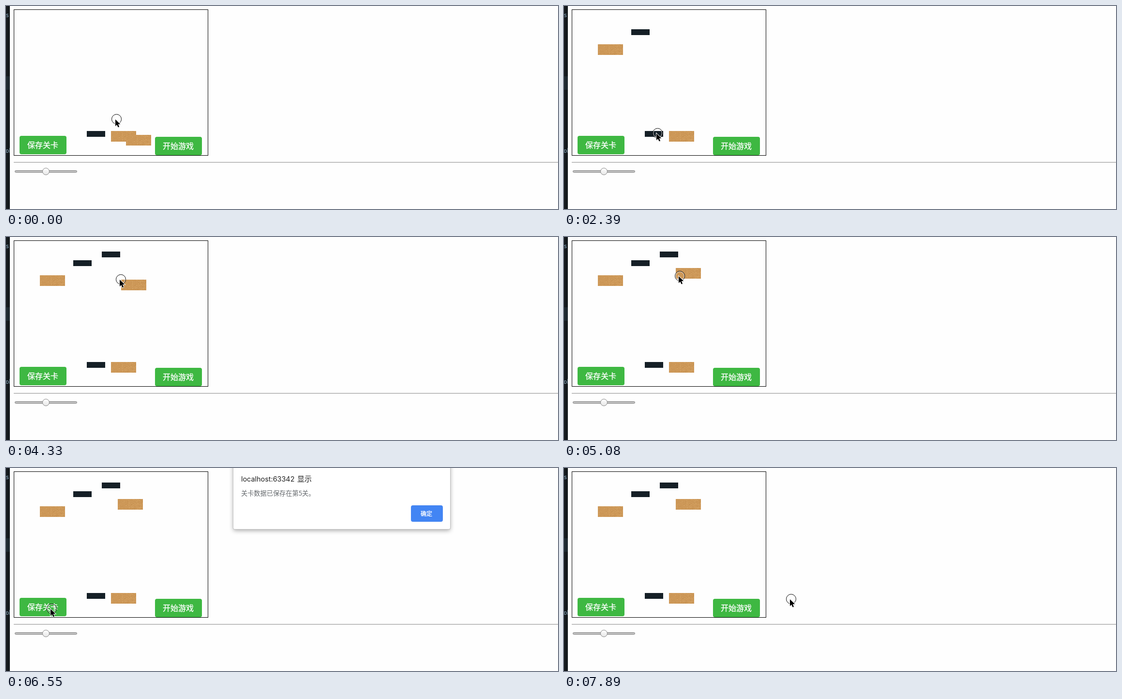
These frames come from a looping animation (1141 px wide and 419 px high, 8 s). An HTML page:

```html
<!DOCTYPE html>
<html lang="zh-CN">
<head>
<meta charset="utf-8">
<title>Level editor</title>
<style>
  html, body { margin: 0; width: 100%; height: 100%; overflow: hidden; background: #fefefe; }
  svg { display: block; width: 1141px; height: 419px; }
  text { font-family: "Noto Sans CJK SC", "Noto Sans CJK", sans-serif; }
  .btn rect { fill: #3eb842; }
  .btn text { fill: #fff; font-size: 16px; stroke: #fff; stroke-width: .3px; }
  .side { font: 600 12px "Open Sans", sans-serif; fill: #7893a6; }
  .panel { filter: drop-shadow(0 3px 5px rgba(0, 0, 0, .35)); }
  .host { font: 14.4px Inter, sans-serif; }
</style>
</head>
<body>
<svg viewBox="0 0 1141 419" xmlns="http://www.w3.org/2000/svg">
  <defs>
    <g id="brick"><rect width="52" height="22" fill="#cd9858"/></g>
    <g id="stone"><rect width="38" height="12" fill="#151f26"/></g>
    <clipPath id="edge"><rect width="8" height="419"/></clipPath>
    <linearGradient id="knob" x2="0" y2="1">
      <stop stop-color="#fff"/><stop offset="1" stop-color="#e6e6e6"/>
    </linearGradient>
    <path id="arrow" d="M0 0V14L3.2 11L5.6 16.3L8.1 15.2L5.8 10H10.3Z"/>
  </defs>

  <rect width="1141" height="419" fill="#fefefe"/>
  <g clip-path="url(#edge)">
    <rect width="8" height="419" fill="#14191d"/>
    <rect y="145" width="8" height="28" fill="#1e2930"/>
    <text class="side" x="0" y="23">s</text>
    <text class="side" x="-1" y="303">ol</text>
  </g>

  <rect x="16.5" y="7.5" width="401" height="301" fill="none" stroke="#000"/>
  <g class="btn">
    <rect x="28" y="268" width="97" height="38" rx="4"/>
    <text x="44" y="293">保存关卡</text>
    <rect x="308" y="270" width="97" height="38" rx="4"/>
    <text x="324" y="295">开始游戏</text>
  </g>
  <rect x="16" y="322" width="1125" height="1" fill="#979797"/>
  <rect x="16" y="323" width="1125" height="1" fill="#ececec"/>
  <rect x="18.5" y="339.5" width="128" height="4" rx="2" fill="#c0c0c0" stroke="#868686"/>
  <circle cx="82.5" cy="341.5" r="7" fill="url(#knob)" stroke="#858585"/>

  <use href="#stone" x="167" y="258"/>
  <use href="#brick" x="217" y="258"/>
  <g id="blocks"></g>

  <g id="dialog">
    <rect class="panel" x="470" y="-20" width="448" height="146" rx="2" fill="#fff"/>
    <rect x="469.5" y="-20" width="449" height="146.5" rx="2.5" fill="none" stroke="#c2c2c2"/>
    <text class="host" x="486" y="28" fill="#222">localhost:63342</text>
    <text x="602" y="28" font-size="15" fill="#222">显示</text>
    <text x="486" y="57" font-size="13.2" fill="#666a6e">关卡数据已保存在第5关。</text>
    <rect x="837.5" y="77.5" width="65" height="33" rx="3" fill="#4285f4" stroke="#4a88f0"/>
    <text x="857" y="98.5" font-size="12" fill="#fff" stroke="#fff" stroke-width=".3">确定</text>
  </g>

  <g id="cursor">
    <circle r="9" fill="none" stroke="#fff"/>
    <circle r="10" fill="none" stroke="#000"/>
    <use href="#arrow" x="-2" y="1.7" opacity=".22"/>
    <use href="#arrow" x="-2.5" y=".5" stroke="#fff" stroke-width="1.8" paint-order="stroke"/>
  </g>
</svg>
<script>
  const NS = "http://www.w3.org/2000/svg";
  const LOOP = 8000, TICK = 149, LAST = 53;
  const LAG = 0.22; // a carried block trails the pointer, in ticks
  const $ = id => document.getElementById(id);
  const clamp = (v, lo, hi) => Math.min(hi, Math.max(lo, v));
  const ease = u => u * u * (3 - 2 * u);

  function add(parent, tag, attrs) {
    const el = document.createElementNS(NS, tag);
    for (const key in attrs) el.setAttribute(key, attrs[key]);
    return parent.appendChild(el);
  }

  // Cardboard grain
  let seed = 7;
  const rand = () => (seed = seed * 16807 % 2147483647) / 2147483647;
  for (let i = 0; i < 160; i++) {
    add($("brick"), "rect", {
      x: Math.floor(rand() * 51), y: Math.floor(rand() * 22),
      width: 1 + Math.floor(rand() * 2), height: 1,
      fill: rand() < 0.5 ? "#bd8848" : "#dbaa6c", opacity: 0.6
    });
  }

  // The pointer's script: moves, pauses and carried blocks, timed in ticks
  const brickBin = [247.5, 266.5], stoneBin = [188.5, 264.5];
  const moves = [], blocks = [];
  let now = -0.25, here = brickBin;

  function go(until, to, bend = 0) {
    moves.push({ start: now, end: until, from: here, to, bend });
    now = until;
    here = to;
  }
  const wait = until => { now = until; };

  function grab(kind) {
    const el = add($("blocks"), "use", { href: "#" + kind });
    blocks.push({ el, grab: now, drop: Infinity });
  }
  const drop = () => { blocks[blocks.length - 1].drop = now; };

  function carry(kind, until, to, bend) {
    grab(kind);
    go(until, to, bend);
    drop();
  }

  carry("brick", 0.68, [69.5, 78.5], 21);
  wait(1);
  go(5, stoneBin);
  wait(6);
  carry("stone", 9.19, [138.5, 47.5], 12.5);
  wait(10);
  go(16, [193.5, 262.5]);
  carry("stone", 20, [197.5, 29.5], 8);
  go(25, brickBin, -79);
  grab("brick");
  go(28.7, [237.5, 87.5]);
  wait(29);
  go(31, [162.5, 44.5]);
  go(32, [230.5, 63.5]);
  drop();
  wait(33);
  go(39, [352.5, 288.5]);
  go(42, [80.5, 290.5]);
  go(44, [94.5, 290.5]);
  const opened = 43;
  go(49, [868.5, 96.5]);
  wait(50);
  const closed = 51;
  go(LAST, [469.5, 270.5]);

  function pointer(k) {
    const m = moves.filter(m => m.start <= k).pop() || moves[0];
    const s = ease(clamp((k - m.start) / (m.end - m.start), 0, 1));
    const [x, y] = m.from.map((v, i) => v + (m.to[i] - v) * s);
    return [x + 4 * m.bend * s * (1 - s), y];
  }

  const show = (el, on) => el.setAttribute("visibility", on ? "visible" : "hidden");

  function draw(t) {
    const k = Math.min(LAST, Math.floor((t + 8) / TICK));
    for (const b of blocks) {
      const [x, y] = pointer(clamp(k - LAG, b.grab, b.drop - 1e-6));
      b.el.setAttribute("x", Math.round(x + 0.5));
      b.el.setAttribute("y", Math.round(y + 0.5));
      show(b.el, k > b.grab);
    }
    const [cx, cy] = pointer(k).map(v => Math.floor(v) + 0.5);
    $("cursor").setAttribute("transform", `translate(${cx} ${cy})`);
    show($("dialog"), k >= opened && k < closed);
  }

  const start = performance.now();
  function loop() {
    draw((performance.now() - start) % LOOP);
    requestAnimationFrame(loop);
  }
  draw(0);
  requestAnimationFrame(loop);
</script>
</body>
</html>
```
